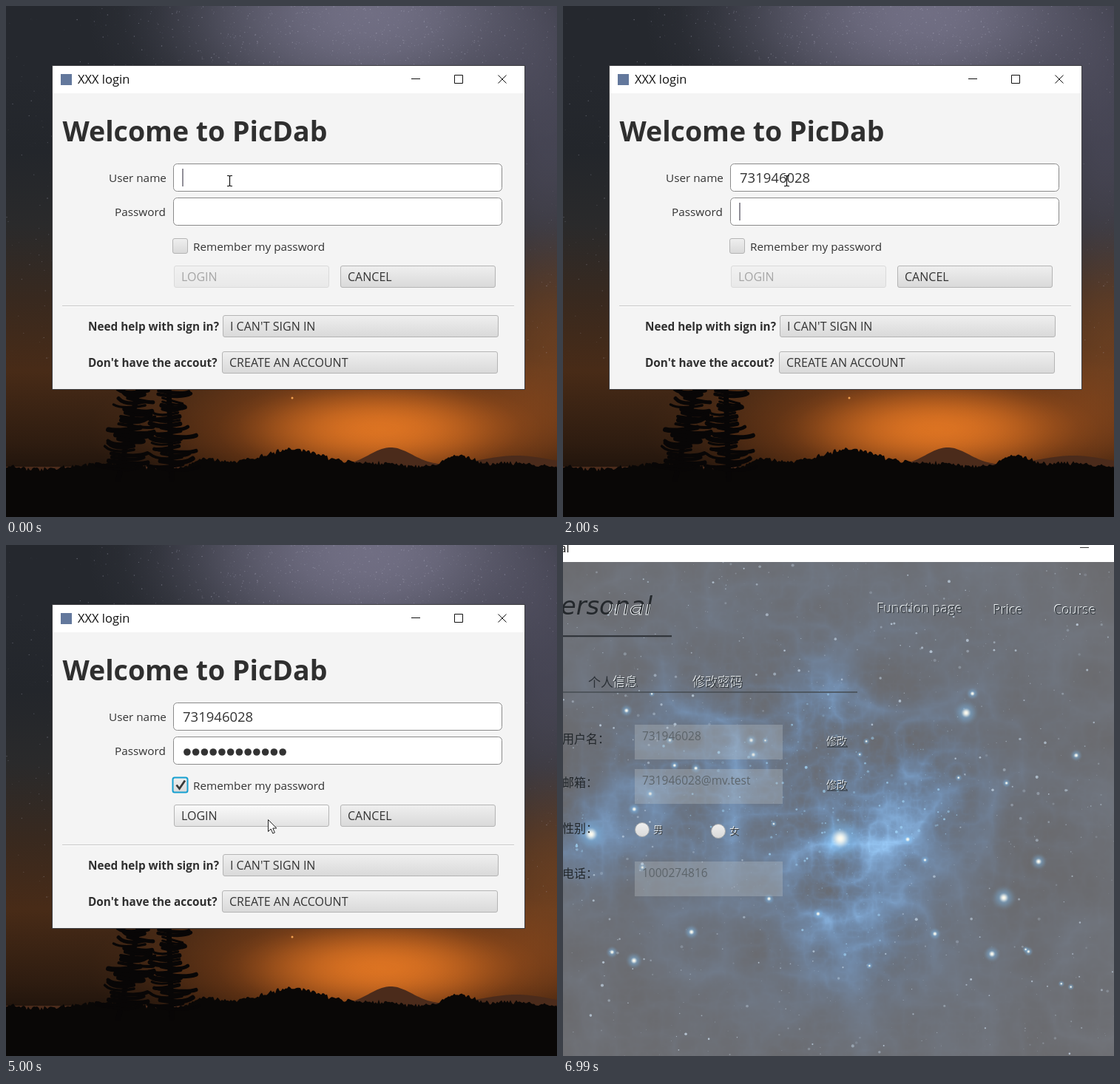
An HTML page with a canvas for the animation above (8000 ms loop, 745x691 px).

```html
<!DOCTYPE html>
<html lang="en">
<head>
<meta charset="utf-8">
<title>Login</title>
<style>
  html, body { margin: 0; width: 745px; height: 691px; overflow: hidden; background: #111; }
  canvas, svg { position: absolute; left: 0; top: 0; }
  text { font-family: "Open Sans", "Noto Sans", "Noto Sans CJK SC", sans-serif; white-space: pre; }
  .slanted { font-family: "DejaVu Sans", sans-serif; font-style: italic; text-anchor: end; }
</style>
</head>
<body>
<canvas id="night" width="745" height="691"></canvas>
<canvas id="space" width="745" height="691"></canvas>
<svg width="745" height="691" viewBox="0 0 745 691">
  <defs>
    <linearGradient id="normal" x2="0" y2="1"><stop stop-color="#efefef"/><stop offset="1" stop-color="#d9d9d9"/></linearGradient>
    <linearGradient id="hover" x2="0" y2="1"><stop stop-color="#fafafa"/><stop offset="1" stop-color="#e2e2e2"/></linearGradient>
    <linearGradient id="pressed" x2="0" y2="1"><stop stop-color="#dcdcdc"/><stop offset="1" stop-color="#c9c9c9"/></linearGradient>
    <clipPath id="lower"><path d="M62 80h62v16h-62z"/></clipPath>
  </defs>
  <g id="login"></g>
  <g id="live"></g>
  <g id="profile"></g>
</svg>
<script>
const W = 745, H = 691;
const $ = id => document.getElementById(id);
const USER = '731946028', MAIL = USER + '@mv.test', PHONE = '1000274816';

// ---------- randomness and shapes ----------
let seed = 7;
const rnd = () => (seed = seed * 16807 % 2147483647) / 2147483647;
const spread = r => (rnd() + rnd() + rnd() - 1.5) * r;
const bump = (d, width) => Math.exp(-((d / width) ** 2));

const lattice = Float32Array.from({ length: 4096 }, rnd);
function noise(x, y) {
  const ix = Math.floor(x), iy = Math.floor(y);
  const ease = k => k * k * (3 - 2 * k);
  const u = ease(x - ix), v = ease(y - iy);
  const at = (a, b) => lattice[(a * 57 + b * 131) & 4095];
  const top = at(ix, iy) * (1 - u) + at(ix + 1, iy) * u;
  const low = at(ix, iy + 1) * (1 - u) + at(ix + 1, iy + 1) * u;
  return top * (1 - v) + low * v;
}

// Ridged octaves give the thin bright threads of a nebula.
function threads(x, y) {
  let sum = 0;
  for (let o = 0, f = 1 / 90, a = .5; o < 5; o++, f *= 2.1, a *= .55)
    sum += a * (1 - Math.abs(2 * noise(x * f + o * 17, y * f + o * 9) - 1)) ** 2;
  return sum;
}

function glow(c, x, y, rx, ry, rgb, alpha) {
  c.save();
  c.translate(x, y);
  c.scale(rx, ry);
  const g = c.createRadialGradient(0, 0, 0, 0, 0, 1);
  for (let k = 0; k <= 1; k += .125)
    g.addColorStop(k, `rgba(${rgb},${alpha * (1 - k * k) ** 2})`);
  c.fillStyle = g;
  c.fillRect(-1, -1, 2, 2);
  c.restore();
}

function dot(c, x, y, r, color) {
  c.fillStyle = color;
  c.beginPath();
  c.arc(x, y, r, 0, 7);
  c.fill();
}

function ridge(c, color, height) {
  c.fillStyle = color;
  c.beginPath();
  c.moveTo(0, H);
  for (let x = 0; x <= W + 2; x += 2) c.lineTo(x, height(x));
  c.lineTo(W, H);
  c.fill();
}

function pine(c, x, lean, half) {
  c.strokeStyle = '#080606';
  c.lineCap = 'round';
  c.lineWidth = 7;
  c.beginPath();
  c.moveTo(x, 514);
  c.lineTo(x + lean, 640);
  c.stroke();
  for (let y = 520; y < 630; y += 5) {
    const side = rnd() < .5 ? -1 : 1, k = (y - 514) / 120;
    const cx = x + lean * k, reach = side * half * (.4 + .3 * k + rnd() * .4);
    c.lineWidth = 3 + rnd() * 4;
    c.beginPath();
    c.moveTo(cx - reach * .5, y);
    c.quadraticCurveTo(cx + reach * .6, y + 6, cx + reach, y + spread(6));
    c.stroke();
  }
}

// ---------- backdrops ----------
function drawNight(c) {
  const sky = c.createLinearGradient(0, 0, 0, H);
  ['#25282e', '#25282e', '#23262b', '#2a2a2b', '#38291f', '#482b17', '#2e1c10', '#090605']
    .forEach((color, i, all) => sky.addColorStop(i / (all.length - 1), color));
  c.fillStyle = sky;
  c.fillRect(0, 0, W, H);
  glow(c, 490, 10, 380, 220, '138,134,160', .75);
  glow(c, 735, 170, 160, 290, '98,94,116', .55);
  glow(c, 745, 470, 140, 190, '135,78,38', .55);
  glow(c, 520, 575, 410, 130, '190,92,28', .7);
  glow(c, 505, 572, 220, 70, '250,132,38', .7);
  for (let i = 0; i < 1800; i++) {
    const band = i % 2, x = band ? 480 + spread(300) : rnd() * W, y = rnd() * (band ? 80 : 480);
    dot(c, x, y, .3 + rnd() * .5, `rgba(195,195,215,${rnd() * .4})`);
  }
  dot(c, 387, 530, 1.5, '#f0a050');
  ridge(c, '#4b2b1b', x => 623 - 26 * bump(x - 520, 42) - 15 * bump(x - 690, 70));
  ridge(c, '#090706', x => 622 + 4 * Math.sin(x / 29) - 26 * bump(x - 394, 52)
    - 11 * bump(x - 268, 25) - 18 * bump(x - 610, 28) + spread(3));
  pine(c, 180, -28, 36);
  pine(c, 220, 4, 36);
}

// Centre x, y, radius and strength of the nebula's main clouds.
const clouds = [[350, 350, 360, .2], [380, 390, 85, .6], [475, 335, 75, .5], [345, 230, 60, .35],
  [185, 320, 110, .4], [30, 390, 60, .35], [390, 510, 75, .45]];
const density = (x, y) => clouds.reduce((sum, [cx, cy, r, k]) => sum + k * bump(Math.hypot(x - cx, y - cy), r), 0);

function star(c, x, y, r) {
  glow(c, x, y, r * 3, r * 3, '130,200,255', .5);
  glow(c, x, y, r * 1.2, r * 1.2, '255,252,240', 1);
}

function drawSpace(c) {
  const img = c.createImageData(W, H);
  for (let y = 0, p = 0; y < H; y++)
    for (let x = 0; x < W; x++, p += 4) {
      const wisp = threads(x, y), v = Math.min(1, density(x, y) * wisp * 1.35);
      const base = 105 + 9 * wisp;
      img.data.set([base - 22 * v + 65 * v * v, base + 48 * v + 45 * v * v, base + 3 + 135 * v, 255], p);
    }
  c.putImageData(img, 0, 0);

  for (let i = 0; i < 2600; i++) {
    const x = rnd() * W, y = 23 + rnd() * 668, near = density(x, y);
    if (rnd() < .3 + near)
      dot(c, x, y, .4 + rnd() ** 5 * 1.7, `rgba(${near > .4 ? '165,220,255' : '205,222,238'},${.15 + rnd() * .6})`);
  }
  for (let i = 0; i < 30; i++) star(c, rnd() * W, 180 + rnd() * 420, 1.5 + rnd() * 2);
  for (const [x, y, r] of [[375, 397, 12], [38, 391, 8], [545, 227, 6], [596, 477, 6], [643, 428, 4], [580, 553, 4], [96, 562, 4]])
    star(c, x, y, r);
  c.fillStyle = '#fff';
  c.fillRect(0, 0, W, 23);
}

// ---------- vector pieces ----------
const text = (x, y, size, str, fill = '#333', more = '') =>
  `<text x="${x}" y="${y}" font-size="${size}" fill="${fill}" ${more}>${str}</text>`;
const rect = (x, y, w, h, fill, more = '') =>
  `<rect x="${x}" y="${y}" width="${w}" height="${h}" fill="${fill}" ${more}/>`;
const path = (d, stroke, width = 1, fill = 'none') =>
  `<path d="${d}" stroke="${stroke}" stroke-width="${width}" fill="${fill}"/>`;
const bold = 'font-weight="700"';

const control = (x, y, w, h, look, focus) =>
  rect(x + .5, y + .5, w - 1, h - 1, `url(#${look})`,
    `rx="2.5" stroke="${focus ? '#159fd0' : '#b4b4b4'}" stroke-width="${focus ? 2 : 1}"`);

const button = (x, y, w, label, look = 'normal', focus = false) =>
  control(x, y, w, 30, look, focus) + text(x + 10, y + 21, 16, label);

const field = y => rect(226.5, y + .5, 444, 37, '#fff', 'rx="5" stroke="#8a8a8a"');

// Dark lettering with a light edge on its upper left.
const ghost = (x, y, size, str) =>
  text(x - 1, y - 1, size, str, '#eef2f4') + text(x, y, size, str, '#3a4046');

function loginMarkup() {
  return rect(62.5, 80.5, 639, 438, '#f4f4f4', 'stroke="#3c3c40"') +
    rect(63, 81, 638, 37, '#fff') +
    rect(74, 92, 15, 15, '#63789c') +
    text(97, 105, 16.5, 'XXX login', '#111') +
    path('M548 98.5h12M606.5 93.5h11v11h-11zM665.5 93.5l11 11M676.5 93.5l-11 11', '#111') +
    text(76.5, 183, 37.5, 'Welcome to PicDab', '#2f2f2f', bold) +
    text(139, 238, 15.3, 'User name') + field(213) +
    text(147, 284, 15.3, 'Password') + field(259) +
    text(253, 331, 15.3, 'Remember my password') +
    button(452, 351, 210, 'CANCEL') +
    path('M76 405.5h611', '#c8c8c8') + path('M76 406.5h611', '#fff') +
    text(111, 439, 15.3, 'Need help with sign in?', '#2f2f2f', bold) +
    button(293, 418, 373, "I CAN'T SIGN IN") +
    text(111, 488, 15.3, "Don't have the accout?", '#2f2f2f', bold) +
    button(292, 467, 373, 'CREATE AN ACCOUNT');
}

function profileMarkup() {
  const label = (y, str) => text(-1, y, 16, str, '#22272b');
  const box = (y, str) => rect(97, y, 200, 47, 'rgba(190,195,198,.32)') + text(107, y + 21, 15.5, str, '#5d656b');
  const link = y => ghost(357, y, 14, '修改') + path(`M357 ${y + 2}h28`, '#2b3036');
  const radio = (x, y, str) =>
    `<circle cx="${x}" cy="${y}" r="9.5" fill="url(#normal)" stroke="#a4a8ab"/>` + ghost(x + 16, y + 5, 13, str);
  return text(8.5, 10, 16, 'Personal', '#111', 'text-anchor="end"') +
    path('M699 3.5h12', '#333') +
    text(121, 94, 33.7, 'Personal', '#24282c', 'class="slanted"') +
    text(120, 94, 33.7, 'Personal', 'none', 'class="slanted" stroke="#eef2f4" clip-path="url(#lower)"') +
    path('M0 123.2h147', '#2b2f34', 2) + path('M0 199h398', '#454b51', 1.5) +
    ghost(425, 92, 17.5, 'Function page') + ghost(582, 94, 17.3, 'Price') + ghost(664, 94, 17.3, 'Course') +
    text(34, 192, 17, '个人', '#2b3036') + ghost(68, 192, 17, '信息') + ghost(176, 192, 17, '修改密码') +
    label(268, '用户名：') + box(243, USER) + link(271) +
    label(327, '邮箱：') + box(303, MAIL) + link(330) +
    label(389, '性别：') + radio(107, 385, '男') + radio(210, 387, '女') +
    label(450, '电话：') + box(428, PHONE);
}

// ---------- timeline ----------
const LOOP = 8000;
const scenes = [
  { at: 0, typed: 0, caret: [239, 220] },
  { at: 1000, typed: 6, caret: [302, 220] },
  { at: 2000, caret: [239, 266] },
  { at: 3000, hidden: 8, caret: [333, 266] },
  { at: 3990, hidden: 12 },
  { at: 5000, hidden: 12, checked: true, focus: 'box', look: 'hover', arrow: [354, 371] },
  { at: 6000, hidden: 12, checked: true, focus: 'button', look: 'pressed', arrow: [350, 362] },
  { at: 6990, profile: true }
];

function liveMarkup({ typed = USER.length, hidden = 0, caret, checked, focus, look, arrow }) {
  let out = text(239, 239, 18.5, USER.slice(0, typed));
  for (let i = 0; i < hidden; i++)
    out += `<circle cx="${244.9 + i * 11.75}" cy="280" r="4.8" fill="#333"/>`;
  if (caret) out += path(`M${caret}v24`, '#77747f', 1.6);

  out += control(225, 314, 21, 21, 'normal', focus === 'box');
  if (checked) out += path('M230.5 324.5l4 5l7.5-11', '#383838', 2.8);
  out += `<g opacity="${hidden ? 1 : .4}">${button(227, 351, 210, 'LOGIN', look, focus === 'button')}</g>`;

  return out + (arrow
    ? path(`M${arrow[0] + .5} ${arrow[1] + .5}v16l3.7-3.5l2.6 6l2.6-1.1l-2.6-5.9h5z`, '#222', 1, '#fff')
    : path('M299 229.5h2.5l1 1l1-1h2.5M302.5 230v13M299 243.5h2.5l1-1l1 1h2.5', '#111', 1.2));
}

drawNight($('night').getContext('2d'));
drawSpace($('space').getContext('2d'));
$('login').innerHTML = loginMarkup();
$('profile').innerHTML = profileMarkup();

let shown;
function tick() {
  const t = performance.now() % LOOP;
  const scene = scenes.filter(s => s.at <= t).pop();
  if (scene !== shown) {
    shown = scene;
    for (const id of ['space', 'profile']) $(id).style.display = scene.profile ? '' : 'none';
    for (const id of ['login', 'live']) $(id).style.display = scene.profile ? 'none' : '';
    $('live').innerHTML = liveMarkup(scene);
  }
  requestAnimationFrame(tick);
}
tick();
</script>
</body>
</html>
```
